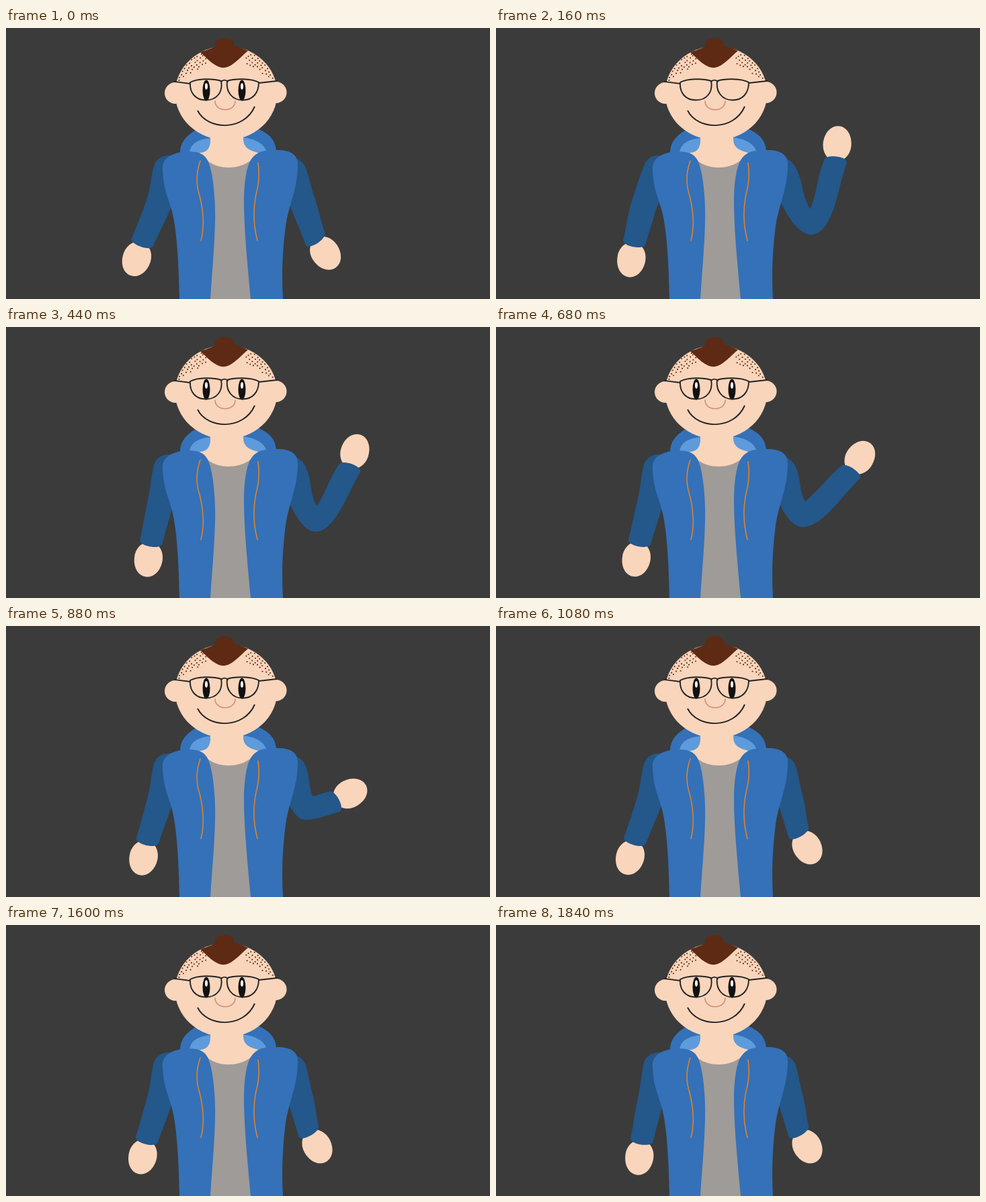
These frames come from a looping animation (720x404 px, 2 s). An HTML page:

```html
<!DOCTYPE html>
<html lang="en">
<head>
<meta charset="utf-8">
<title>Waving character</title>
<style>
  html, body { margin: 0; width: 100%; height: 100%; overflow: hidden; background: #3b3b3b; }
  svg { display: block; width: 100%; height: 100%; }
  .skin { fill: #f9d5bb; }
  .jacket { fill: #3471b8; }
  .sleeve { fill: #24578a; }
  .lining { fill: #5d9bdc; }
  .hair { fill: #5e2a13; }
  .line { fill: none; stroke: #222; stroke-width: 1.9; stroke-linecap: round; }
  .cord { fill: none; stroke: #e0822b; stroke-width: 1.6; stroke-linecap: round; }
</style>
</head>
<body>
<svg viewBox="0 0 720 404">
  <defs>
    <path id="hand" d="M0-25C15-25 21-11 21-1C21 15 12 27 0 27S-21 15-21-1C-21-11-15-25 0-25Z"/>
    <g id="eye">
      <ellipse rx="5.5" ry="15.5" fill="#111"/>
      <ellipse cy="-6" rx="2" ry="4.7" fill="#fff"/>
    </g>
  </defs>
  <rect width="720" height="404" fill="#3b3b3b"/>

  <use id="leftHand" href="#hand" class="skin"/>
  <path id="leftSleeve" class="sleeve"/>
  <use id="rightHand" href="#hand" class="skin"/>
  <path id="rightSleeve" class="sleeve"/>

  <path class="jacket" d="M259 188C258 170 270 159 284 151H376C392 158 402 168 402 186Z"/>
  <path class="lining" d="M273 187C274 172 286 166 305 164V187ZM388 185C384 172 370 165 351 163V187Z"/>
  <path fill="#9f9b98" d="M296 196H368V404H296Z"/>
  <path class="skin" d="M304 150V170C303 181 297 186 288 186L301 199C318 211 344 211 362 199L376 186C362 183 353 178 353 166V150Z"/>
  <path class="jacket" d="M233 212C231 197 243 187 262 185C285 182 297 187 302 202C308 218 312 255 311 290C310 330 306 370 304 404H258C257 360 255 300 246 270C240 250 234 238 233 212Z"/>
  <path class="jacket" d="M364 404C360 360 354 300 354 260C354 235 357 208 364 197C371 186 380 182 400 182C425 181 435 190 434 205C434 240 420 265 416 295C411 335 410 370 412 404Z"/>
  <path class="cord" d="M289 198C283 215 282 232 288 250C295 278 295 298 290 317M375 201C378 222 375 236 372 248C367 272 368 294 374 317"/>

  <g class="skin">
    <circle cx="252" cy="97" r="16"/>
    <circle cx="401.5" cy="96" r="16"/>
    <ellipse cx="327.5" cy="97" rx="76" ry="70"/>
  </g>
  <g id="stubble" class="hair"></g>
  <g class="hair">
    <ellipse cx="325" cy="24" rx="14" ry="9"/>
    <path d="M289 36C302 32 308 29 315 26H338C348 29 354 31 360 34C350 42 338 57 326 59C312 61 298 44 289 36Z"/>
  </g>
  <g id="eyes">
    <use href="#eye" x="298" y="93"/>
    <use href="#eye" x="351" y="93"/>
  </g>
  <path class="line" d="M274 81C285 75 308 75 320 79C323 95 314 107.5 297.5 107.5C282 107.5 273 97 274 81ZM329 79C340 75 365 75 376 81C376 97 367 107.5 352 107.5C336 107.5 327 95 329 79ZM320 80C323 77 327 77 330 80M251 80L274 83M376 82L403 79"/>
  <path class="line" style="stroke:#cf9279;stroke-width:1.7" d="M311 109C311 126 341 126 341 109"/>
  <path class="line" style="stroke-linecap:butt" d="M285 123C300 153 354 154 370 117"/>
</svg>
<script>
const LOOP = 2000, STEP = 40, LAST = 1840;
const SHOULDER_R = 22, ELBOW_R = 19, CUFF_R = 17, HAND_REACH = 26;
const $ = id => document.getElementById(id);

const add = (p, q, k = 1) => [p[0] + q[0] * k, p[1] + q[1] * k];
const mix = (p, q, k) => add(p, add(q, p, -1), k);
const unit = p => add([0, 0], p, 1 / Math.hypot(...p));
const direction = (from, to) => unit(add(to, from, -1));
const distance = (p, q) => Math.hypot(p[0] - q[0], p[1] - q[1]);
const normal = ([x, y]) => [y, -x];
const turn = ([x, y], a) => [x * Math.cos(a) - y * Math.sin(a), x * Math.sin(a) + y * Math.cos(a)];

// Each key places the elbow and the wrist at a moment.
const key = (time, elbow, wrist) => ({ time, elbow, wrist });

const left = {
  side: "left", shoulder: [241, 212], bend: -0.07, ease: k => k ** 1.4,
  keys: [
    key(0, [227, 263], [203, 319]),
    key(160, [220, 264], [206, 319]),
    key(440, [230, 260], [216, 320]),
    key(1260, [227, 263], [203, 319]),
    key(LAST, [230, 260], [217, 320])
  ]
};
const right = {
  side: "right", shoulder: [425, 216], bend: -0.28, ease: k => k * k * (3 - 2 * k),
  keys: [
    key(0, [442, 262], [460, 314]),
    key(160, [469, 289], [505, 199]),
    key(300, [456, 279], [527, 217]),
    key(440, [461, 286], [511, 211]),
    key(600, [456, 279], [527, 217]),
    key(680, [456, 279], [527, 217]),
    key(1080, [439, 262], [450, 307]),
    key(LAST, [439, 262], [450, 307])
  ]
};

function drawArm({ side, shoulder, bend, ease, keys }, t) {
  const i = Math.max(1, keys.findIndex(k => k.time >= t));
  const a = keys[i - 1], b = keys[i];
  const k = ease((t - a.time) / (b.time - a.time));
  const elbow = mix(a.elbow, b.elbow, k), wrist = mix(a.wrist, b.wrist, k);

  const upper = direction(shoulder, elbow), fore = direction(elbow, wrist);
  const along = unit(add(upper, fore)), handDir = turn(fore, bend);
  const upperReach = distance(shoulder, elbow) / 3, foreReach = distance(elbow, wrist) / 3;

  // The elbow is cut along its bisector: sharp inside the bend, smooth outside.
  const across = normal(along);
  const crook = add(elbow, across, ELBOW_R), tip = add(elbow, across, -ELBOW_R);
  const top = add(shoulder, normal(upper), SHOULDER_R), bottom = add(shoulder, normal(upper), -SHOULDER_R);
  const cuffA = add(wrist, normal(handDir), CUFF_R), cuffB = add(wrist, normal(handDir), -CUFF_R);
  const curve = (...points) => "C" + points.join(" ");

  $(side + "Sleeve").setAttribute("d", "M" + top
    + curve(add(top, upper, upperReach), add(crook, upper, -upperReach), crook)
    + curve(add(crook, fore, foreReach), add(cuffA, fore, -foreReach), cuffA)
    + curve(add(cuffA, handDir, 10), add(cuffB, handDir, 10), cuffB)
    + curve(add(cuffB, fore, -foreReach), add(tip, along, foreReach), tip)
    + curve(add(tip, along, -upperReach), add(bottom, upper, upperReach), bottom)
    + `A${SHOULDER_R} ${SHOULDER_R} 0 0 1 ${top}Z`);

  const [x, y] = add(wrist, handDir, HAND_REACH);
  const angle = Math.atan2(-handDir[0], handDir[1]) * 180 / Math.PI;
  $(side + "Hand").setAttribute("transform", `translate(${x} ${y}) rotate(${angle})`);
}

function addStubble() {
  let seed = 7, dots = "";
  const jitter = () => (seed = seed * 16807 % 2147483647) / 2147483647 * 2.4 - 1.2;
  for (const side of [-1, 1])
    for (let ring = 0; ring < 5; ring++) {
      const r = 0.965 - ring * 0.07;
      for (let a = 0.2 + (ring % 2) * 0.035; a < 1.2; a += 0.073 / r) {
        const dx = 76 * r * Math.cos(a) + jitter();
        const y = 97 - 70 * r * Math.sin(a) + jitter();
        const underHair = dx < 74 - y;
        const belowEdge = y > 80 - (72.5 - dx) * 0.62;
        if (underHair || belowEdge) continue;
        dots += `<circle cx="${327.5 + side * dx}" cy="${y}" r="1.05"/>`;
      }
    }
  $("stubble").innerHTML = dots;
}

function draw(time) {
  const t = Math.min(LAST, Math.floor(time % LOOP / STEP) * STEP);
  drawArm(left, t);
  drawArm(right, t);
  $("eyes").setAttribute("visibility", t >= 120 && t < 240 ? "hidden" : "visible");
}

addStubble();
const start = performance.now();
function tick() {
  draw(performance.now() - start);
  requestAnimationFrame(tick);
}
tick();
</script>
</body>
</html>
```
